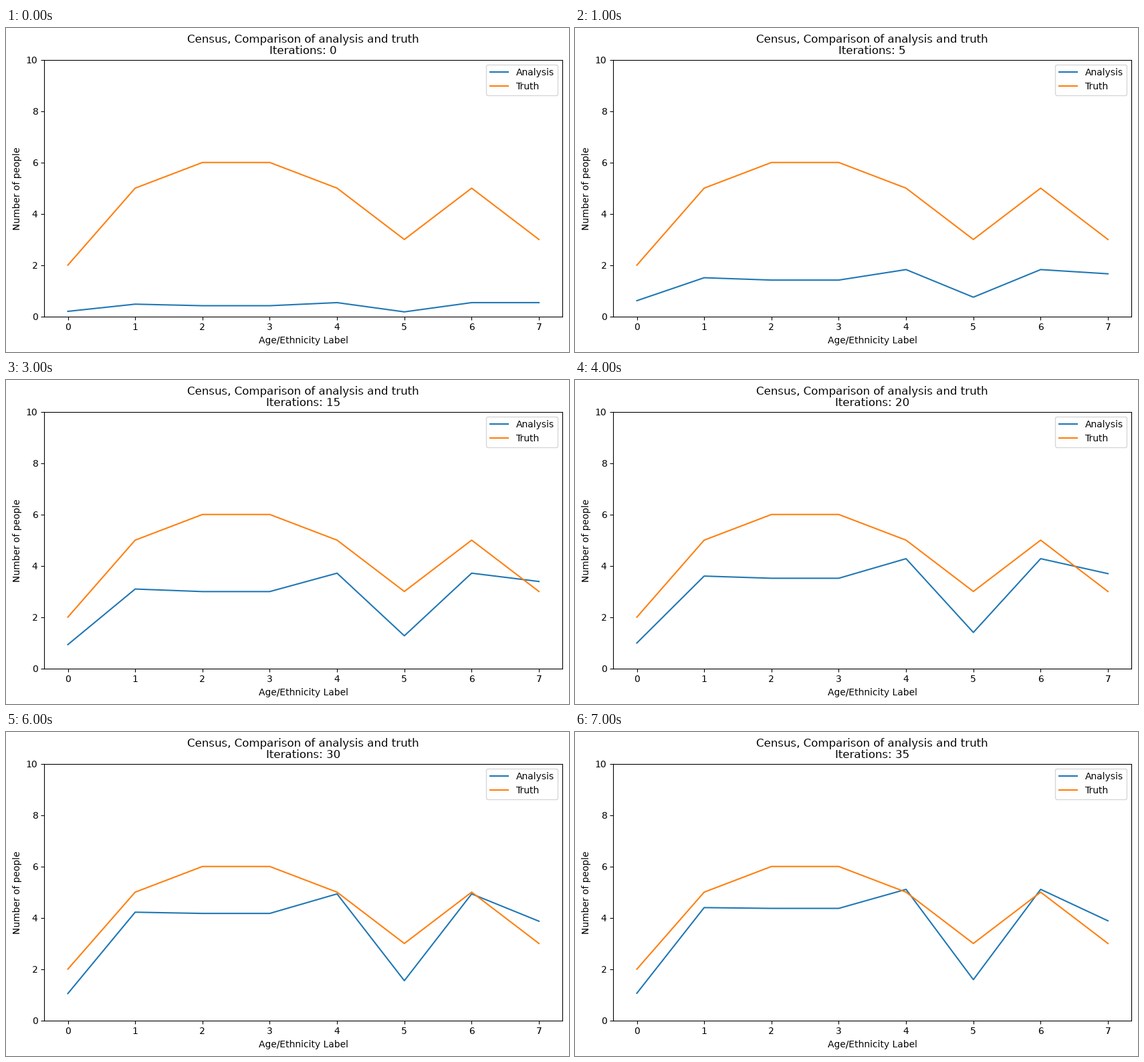
Animation, 842 px wide and 486 px high, one loop 8000 ms. Source, as a matplotlib script:

```python
import numpy as np
import matplotlib.pyplot as plt
from matplotlib.animation import FuncAnimation

W, H, DPI = 842, 486, 100
LEFT, TOP, AX_W, AX_H = 57.28, 47.72, 775, 385
PICTURES, STEP = 8, 5  # iterations advance by STEP per picture

plt.rcParams["font.family"] = "DejaVu Sans"
plt.rcParams["text.hinting"] = "default"

labels = np.arange(8)
truth = [2, 5, 6, 6, 5, 3, 5, 3]

# Learning curve per kind of group: start, gain, time scale, shape
curves = np.array([
    [0.20, 0.88, 8.1, 0.93],
    [0.48, 4.30, 15.9, 1.12],
    [0.42, 4.40, 16.8, 1.12],
    [0.54, 4.90, 14.45, 1.12],
    [0.18, 1.50, 11.2, 0.91],
    [0.54, 3.35, 9.48, 1.40],
])
kinds = [0, 1, 2, 2, 3, 4, 3, 5]


def estimate(n):
    """Estimated counts after n iterations, rising towards a plateau."""
    start, gain, scale, shape = curves[kinds].T
    return start + gain * (1 - np.exp(-(n / scale) ** shape))


fig = plt.figure(figsize=(W / DPI, H / DPI), dpi=DPI, facecolor="white")
ax = fig.add_axes([LEFT / W, 1 - (TOP + AX_H) / H, AX_W / W, AX_H / H])
analysis, = ax.plot(labels, estimate(0), color="#1f77b4", label="Analysis")
ax.plot(labels, truth, color="#ff7f0e", label="Truth")
ax.set_ylim(0, 10)
ax.set_xlabel("Age/Ethnicity Label")
ax.set_ylabel("Number of people")
ax.legend(loc="upper right")

# Heading sits one line above the counter.
ax.annotate("Census, Comparison of analysis and truth", (0.5, 1),
            xycoords="axes fraction", xytext=(0, 18.2),
            textcoords="offset points", ha="center", va="baseline", size=12)
counter = ax.set_title("", size=12)


def draw(i):
    n = i * STEP
    analysis.set_ydata(estimate(n))
    counter.set_text(f"Iterations: {n}")
    return analysis, counter


anim = FuncAnimation(fig, draw, frames=PICTURES, interval=1000,
                     repeat=True, repeat_delay=0)
plt.show()
```
